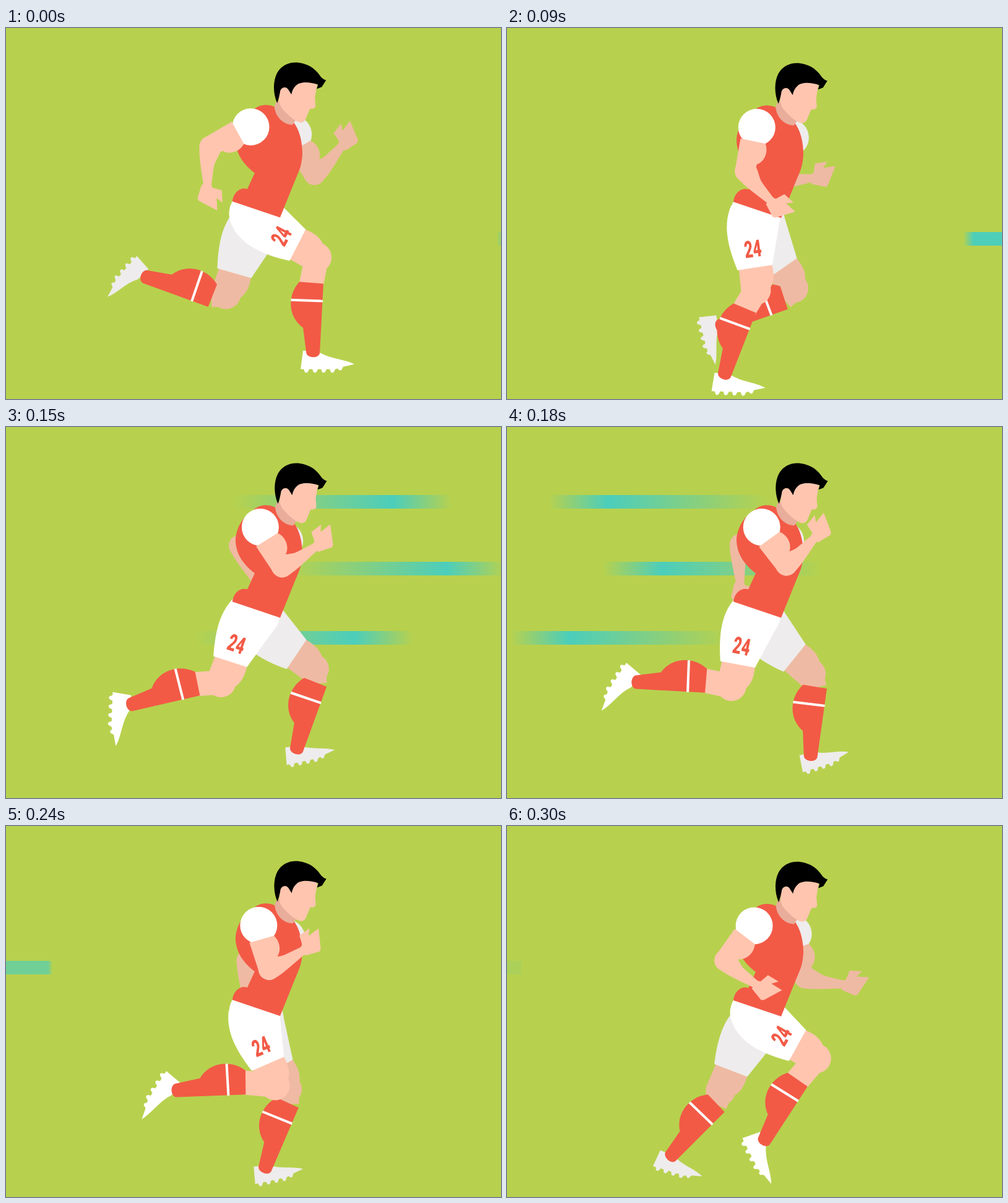
Animation, 800 px wide and 600 px high, one loop 330 ms. Source, as an HTML page:

```html
<!DOCTYPE html>
<html lang="en">
<head>
<meta charset="utf-8">
<title>Running footballer</title>
<style>
html, body { margin: 0; width: 100%; height: 100%; overflow: hidden; background: #b7d14e; }
svg { display: block; width: 100vw; height: 100vh; }
text { font: 800 38px Roboto, sans-serif; text-anchor: middle; }
</style>
</head>
<body>
<svg id="stage" viewBox="0 0 800 600"></svg>
<script>
const RED = '#f25a46', SKIN = '#ffc5af', SHADE = '#efbaa3', GREY = '#eeecec', WHITE = '#fff';
const STEP = 30, COUNT = 11, TURN = 2 * Math.PI / COUNT;

// joint angles in degrees at the key steps of the running cycle
const KEYS = [0, 2, 4, 5, 7, 9, 10];
const legs = {
  near: {
    hip: [401.5, 300], inset: [0, 0], cuff: [13, 41], slide: 7, heel: [-2, -1],
    thigh: [-62, -35, 19, 19, -1, -46, -60],
    shin: [3, 13, 36, 77, 98, 68, 33],
    foot: [0, -4, 21, 92, 135, 97, 63]
  },
  far: {
    hip: [398, 311.5], inset: [9, 4], cuff: [29, 20], slide: 0, heel: [-5, -4],
    thigh: [17, -4, -62, -55, -43, -10, 22],
    shin: [110, 96, 41, 20, 5, 45, 45],
    foot: [131, 117, 27, -12, -17, -3, 17]
  }
};
const arms = {
  nearArm: {
    shoulder: a => [421 - a * .165, 159.5],
    upper: [154, 132, 75, 61, 60, 100, 130],
    fore: [94, 84, 7, -31, -45, -3, 38]
  },
  farArm: {
    shoulder: a => [472 - a * .125, 166 + a * .09],
    upper: [62, 92, 138, 174, 166, 125, 75],
    fore: [-46, -33, 36, 65, 104, 62, 10]
  }
};
// top of each streak and its lead over the first
const lanes = [[110, 0], [218, 87], [330, -62]];

const stage = document.getElementById('stage');
const path = (d, fill, extra = '') => `<path d="${d}" fill="${fill}" ${extra}/>`;
const disc = (x, y, r, fill) => `<circle cx="${x}" cy="${y}" r="${r}" fill="${fill}"/>`;
const part = (id, body) => `<g id="${id}">${body}</g>`;

function drawLeg(id, skin, cloth, label) {
  const thigh = path('M-38 84L16 83C18 100 16 112 8 122L-16 140L-39 122Z', skin) + disc(-15, 122, 24, skin);
  const shorts = disc(0, 0, 41, cloth) +
    path('M-37 -19C-53 8 -53 40 -40.5 86L16.5 85L41 4Z', cloth) + label;
  const studs = 'l5 0l2 5q3 2 5 -1l2 -4'.repeat(4);
  const foot = path(`M-14 -2L-18 28${studs}l4 -1l3 3q4 0 4 -3l2 -3L69 20C52 11 30 12 11 0Z`,
    cloth, id === 'far' ? 'transform="scale(.93)"' : '');
  const sock = path('M0 0L-39 -1C-47 9 -51 20 -51 33C-51 50 -42 65 -29 73L-22 112C-21 122 -1 122 0 112Z', RED) +
    '<path d="M-51 29L.5 28" stroke="#fff" stroke-width="4"/>';
  return part(id + 'Thigh', thigh) +
    `<line id="${id}Shin" stroke="${skin}" stroke-width="39"/>` +
    part(id + 'Shorts', shorts) + part(id + 'Foot', foot) + part(id + 'Sock', sock);
}

function drawArm(id, skin, cloth) {
  return part(id + 'Sleeve', disc(0, 0, 30, cloth)) +
    part(id + 'Upper', path('M22 -20C35 -29 52 -25 58 -15L73 -15L73 17L24 21Z', skin) + disc(73, 0, 17.5, skin)) +
    part(id + 'Fore', path('M0 -17C14 -18 20 -9 34 -8L66 -6L66 6C45 10 15 18 0 17Z', skin)) +
    part(id + 'Hand', path('M-5 -6L2 -8L7 -23L27 -23L19 -14L39 -14L22 15L18 17L-4 9Z', skin));
}

const torso = path('M400 132C408 123 424 122 434 127L463 150C475 163 479 185 479 203C478 222 474 230 468 244' +
  'L443 306L366 280C367 267 378 256 390 260L402 234C386 222 372 205 371 182C371 160 385 140 400 132Z', RED);
const head = path('M438 117C434 122 433 127 434 130C437 146 450 156 463 156L469 147L446 118Z', '#e8ad9b') +
  path('M441 118C441 100 444 94 452 95L465 85L503 88L499 112L500 126Q499 131 491 130L484 147Q481 153 475 152' +
    'Q468 151 458 142C448 133 442 126 441 118Z', SKIN) +
  path('M438 121C431 105 431 85 438 72C446 58 462 52 480 57C495 61 503 70 509 79Q513 83 517 84L510 95L502 98' +
    'L504 91C490 86 475 86 469 92C463 97 462 103 461 107L456 99C452 93 445 95 443 101C442 108 440 115 438 121Z', '#000');
const label = `<text transform="translate(-11.5 68.5) scale(.63 1)" fill="${RED}">24</text>`;

stage.innerHTML =
  `<defs><linearGradient id="fade">${'<stop stop-color="#09ccff"/>'.repeat(4)}</linearGradient></defs>` +
  '<rect width="800" height="600" fill="#b7d14e"/>' +
  lanes.map(([y]) => `<rect class="streak" y="${y}" height="22" fill="url(#fade)"/>`).join('') +
  drawArm('farArm', SHADE, GREY) + drawLeg('far', SHADE, GREY, '') + drawLeg('near', SKIN, WHITE, label) +
  part('torso', torso) + part('head', head) + drawArm('nearArm', SKIN, WHITE);

const el = {};
stage.querySelectorAll('[id]').forEach(e => el[e.id] = e);
const bars = stage.querySelectorAll('.streak');
const stops = el.fade.children;

function set(node, attrs) {
  for (const k in attrs) node.setAttribute(k, attrs[k]);
}
function place(id, [x, y], angle = 0, more = '') {
  set(el[id], { transform: `translate(${x} ${y}) rotate(${angle}) ${more}` });
}
// point (x, y) turned by an angle about an origin
function turn([ox, oy], angle, x, y) {
  const a = angle * Math.PI / 180, c = Math.cos(a), s = Math.sin(a);
  return [ox + x * c - y * s, oy + x * s + y * c];
}

// periodic cubic through the key angles
function ease(angles, step) {
  const n = KEYS.length;
  const i = KEYS.findLastIndex(k => k <= step);
  const at = j => KEYS[(j + n) % n] + COUNT * Math.floor(j / n);
  const val = j => angles[(j + n) % n];
  const slope = j => (val(j + 1) - val(j - 1)) / (at(j + 1) - at(j - 1));
  const h = at(i + 1) - at(i), u = (step - at(i)) / h, v = 1 - u;
  return val(i) * v * v * (1 + 2 * u) + val(i + 1) * u * u * (1 + 2 * v) +
    h * u * v * (slope(i) * v - slope(i + 1) * u);
}

function poseLeg(id, step, bob) {
  const leg = legs[id], [ix, iy] = leg.inset, [cx, cy] = leg.cuff;
  const [thigh, shin, foot] = [leg.thigh, leg.shin, leg.foot].map(a => ease(a, step));
  const hip = [leg.hip[0], leg.hip[1] + bob];
  const knee = turn(hip, thigh, ix - 15, iy + 122);
  const top = turn(knee, shin, cx, cy + leg.slide * Math.cos(TURN * (step - 8.5)));
  const cuff = turn(top, shin, -19.5, 2);
  const ankle = turn(top, shin, -11, 112);
  const shift = `translate(${ix} ${iy})`;
  place(id + 'Thigh', hip, thigh, shift);
  place(id + 'Shorts', hip, thigh, shift);
  set(el[id + 'Shin'], { x1: knee[0], y1: knee[1], x2: cuff[0], y2: cuff[1] });
  place(id + 'Sock', top, shin);
  place(id + 'Foot', [ankle[0] + leg.heel[0], ankle[1] + leg.heel[1]], foot);
}

function poseArm(id, step, bob) {
  const upper = ease(arms[id].upper, step), fore = ease(arms[id].fore, step);
  const [x, y] = arms[id].shoulder(upper);
  const shoulder = [x, y + bob];
  const elbow = turn(shoulder, upper, 73, 0);
  place(id + 'Sleeve', shoulder);
  place(id + 'Upper', shoulder, upper);
  place(id + 'Fore', elbow, fore);
  place(id + 'Hand', turn(elbow, fore, 65, 0), fore - 7);
}

// streaks rush through mid-loop, blurred while fastest, fading in and out around it
function poseStreaks(step) {
  const d = step - 5.5, fast = Math.abs(d) < 1;
  const middle = 394 - 540 * Math.tanh(.57 * d);
  const width = fast ? 353 : 151;
  const opacity = fast ? .62 : Math.exp((1.5 - Math.abs(d)) * (d < 0 ? .5 : .9));
  const soft = .3 * opacity * opacity, peak = .5 - .46 * d;
  const marks = fast ? [0, peak, peak, 1] : [0, soft, 1 - soft, 1];
  marks.forEach((offset, i) => set(stops[i], { offset, 'stop-opacity': i % 3 ? 1 : 0 }));
  bars.forEach((bar, i) => set(bar, { x: middle - width / 2 + lanes[i][1], width, opacity }));
}

function draw(step) {
  const bob = 1.7 - 1.3 * Math.cos(3 * TURN * step);
  for (const id in legs) poseLeg(id, step, bob);
  for (const id in arms) poseArm(id, step, bob);
  place('torso', [0, bob]);
  place('head', [bob * .6, bob * 1.3]);
  poseStreaks(step);
}

function tick() {
  draw(Math.floor(performance.now() / STEP) % COUNT);
  requestAnimationFrame(tick);
}
tick();
</script>
</body>
</html>
```
